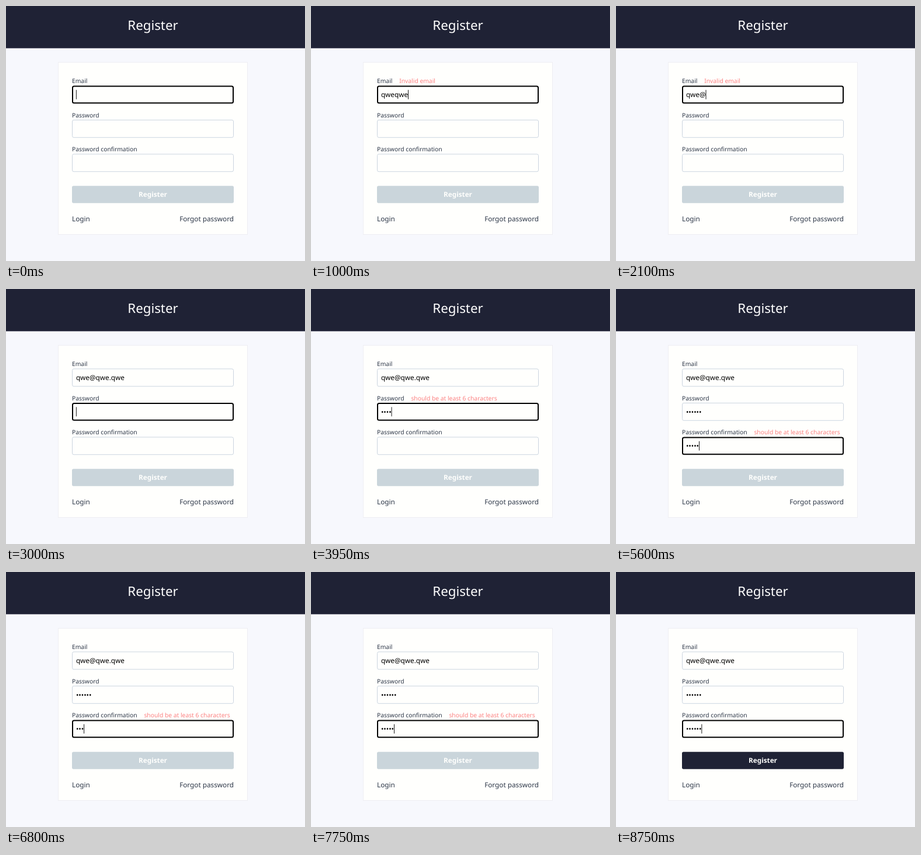
An HTML page that plays this animation: 512x437 px, repeating every 9000 ms.

```html
<!DOCTYPE html>
<html lang="en">
<head>
<meta charset="utf-8">
<title>Register</title>
<style>
  html, body { margin: 0; width: 100%; height: 100%; overflow: hidden; background: #f7f8fd; }
  svg { display: block; width: 512px; height: 437px; }
  text { font: 11.76px "Noto Sans", sans-serif; fill: #2d3748; text-rendering: geometricPrecision; white-space: pre; }
  .title { font-size: 22.3px; font-weight: 500; fill: #fff; text-anchor: middle; }
  .label { font-size: 10.3px; }
  .error { fill: #fc8181; }
  .value { fill: #000; }
  .box { fill: #fffffd; stroke: #cbd5e0; }
  .box.focus { stroke: #000; stroke-width: 2; }
  .button { font-weight: 600; fill: #fffffd; text-anchor: middle; }
  .end { text-anchor: end; }
</style>
</head>
<body>
<svg viewBox="0 0 512 437">
  <rect width="512" height="437" fill="#f7f8fd"/>
  <rect width="512" height="72.4" fill="#1f2235"/>
  <text class="title" x="251.5" y="40.6">Register</text>
  <rect x="89.5" y="96.5" width="324" height="295" fill="#fffffd" stroke="#eeeef3"/>
  <g id="form"></g>
  <rect id="caret" width=".9" height="16" fill="#000"/>
  <rect id="button" x="113" y="308.2" width="277" height="29.5" rx="2.6"/>
  <text class="button" x="251.5" y="327.2">Register</text>
  <text x="113" y="368.8">Login</text>
  <text class="end" x="390" y="368.8">Forgot password</text>
</svg>
<script>
const LOOP = 9000;
const TEXT_X = 119.9;
const dots = edits => edits.map(([time, count]) => [time, "•".repeat(count)]);
const tooShort = value => value.length < 6;

// edits: [time in ms, value from then on]
const fields = [
  {
    label: "Email", message: "Invalid email", focusAt: 0,
    invalid: value => !/^\S+@\S+\.\S{2,}$/.test(value),
    edits: [
      [650, "q"], [700, "qw"], [800, "qwe"], [850, "qweq"], [900, "qweqw"],
      [1000, "qweqwe"], [1050, "qweqweq"], [1500, ""],
      [1800, "q"], [1850, "qw"], [1900, "qwe"], [2100, "qwe@"],
      [2250, "qwe@qw"], [2300, "qwe@qwe"],
      [2450, "qwe@qwe."], [2500, "qwe@qwe.qw"], [2550, "qwe@qwe.qwe"]
    ]
  },
  {
    label: "Password", message: "should be at least 6 characters", focusAt: 3000,
    invalid: tooShort,
    edits: dots([[3450, 1], [3550, 2], [3650, 3], [3950, 4], [4000, 5], [4050, 6]])
  },
  {
    label: "Password confirmation", message: "should be at least 6 characters", focusAt: 4750,
    invalid: tooShort,
    edits: dots([
      [5150, 1], [5250, 2], [5350, 3], [5500, 4], [5600, 5], [5700, 6], [5850, 7],
      [6400, 6], [6550, 5], [6700, 4], [6750, 3], [6900, 2], [7050, 1], [7200, 0],
      [7400, 1], [7450, 2], [7500, 3], [7750, 5], [7850, 6]
    ])
  }
];
const caretOff = [[350, 650], [4500, 4750], [6300, 6800], [8300, 8750]];
const submitReadyAt = 7850;

const form = document.getElementById("form");
const caret = document.getElementById("caret");
const button = document.getElementById("button");

function add(parent, tag, attributes, content = "") {
  const node = document.createElementNS("http://www.w3.org/2000/svg", tag);
  for (const name in attributes) node.setAttribute(name, attributes[name]);
  node.textContent = content;
  return parent.appendChild(node);
}

fields.forEach((field, i) => {
  field.y = 136.4 + 58.5 * i;
  const label = add(form, "text", { class: "label", x: 113, y: field.y - 4 }, field.label);
  field.error = add(label, "tspan", { class: "error", dx: 11.8 }, field.message);
  field.box = add(form, "rect", {});
  field.text = add(form, "text", { class: "value", x: TEXT_X, y: field.y + 20 });
});

function drawField(field, time, focused) {
  const edit = field.edits.findLast(([start]) => start <= time);
  const value = edit ? edit[1] : "";
  const inset = focused ? 1 : 0.5;
  const box = {
    class: focused ? "box focus" : "box",
    x: 113 + inset, y: field.y + inset,
    width: 277 - 2 * inset, height: 30.9 - 2 * inset, rx: 2.6
  };
  for (const name in box) field.box.setAttribute(name, box[name]);
  field.text.textContent = value;
  field.error.setAttribute("visibility", edit && field.invalid(value) ? "visible" : "hidden");
}

function draw(time) {
  const active = fields.findLast(field => field.focusAt <= time);
  fields.forEach(field => drawField(field, time, field === active));
  const hidden = caretOff.some(([from, to]) => time >= from && time < to);
  caret.setAttribute("x", TEXT_X + active.text.getComputedTextLength());
  caret.setAttribute("y", active.y + 7.4);
  caret.setAttribute("visibility", hidden ? "hidden" : "visible");
  button.setAttribute("fill", time >= submitReadyAt ? "#1f2235" : "#cad5db");
}

const start = performance.now();
function tick() {
  draw((performance.now() - start) % LOOP);
  requestAnimationFrame(tick);
}
tick();
</script>
</body>
</html>
```
